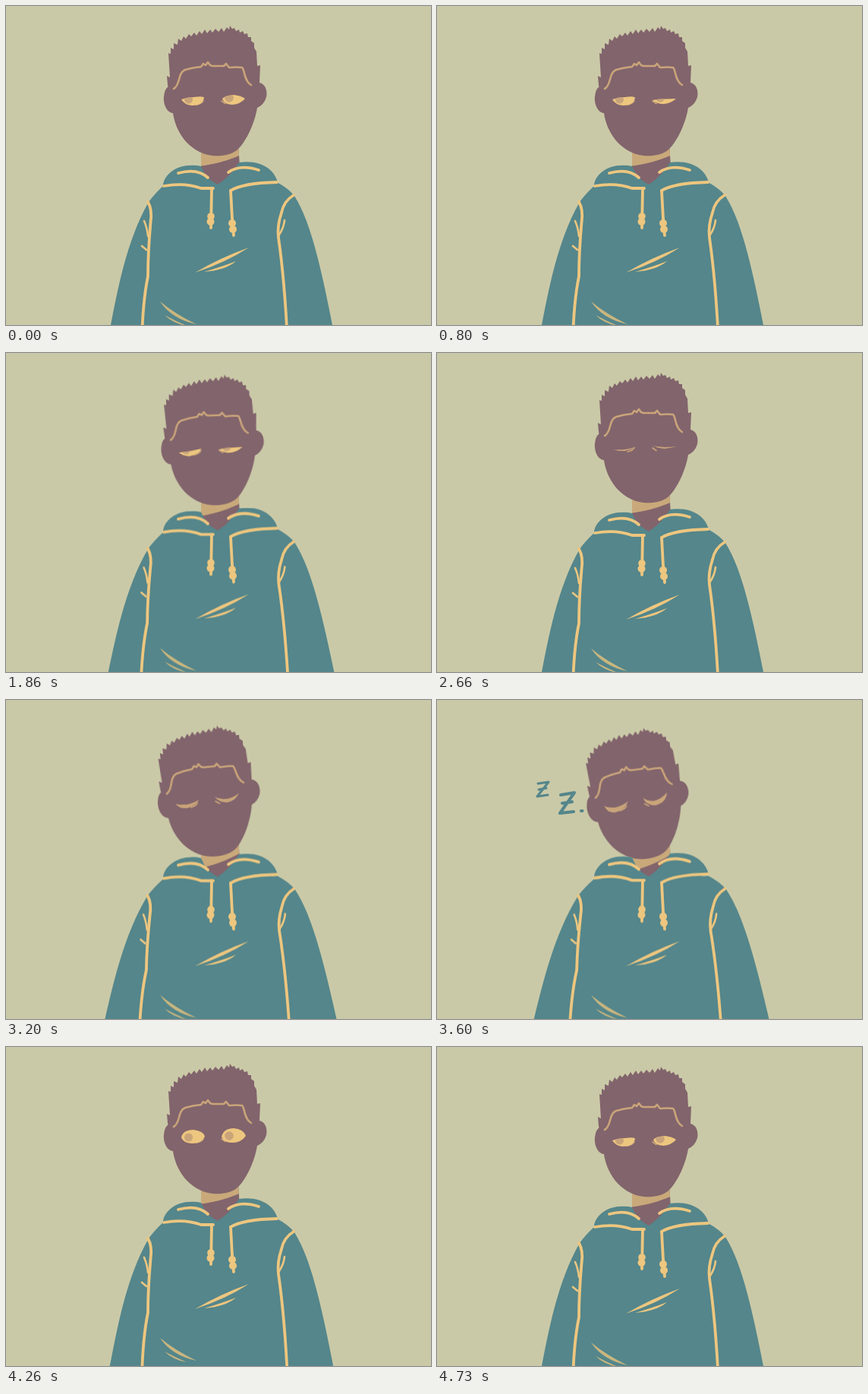
Write an HTML page without scripts that moves like this. It is 560 by 420 pixels and loops after 5000 ms.

```html
<!DOCTYPE html>
<html lang="en">
<head>
<meta charset="utf-8">
<title>Dozing off</title>
<style>
/* How far the sleeves sag outwards: 0 upright, 1 asleep. */
@property --sag { syntax: "<number>"; inherits: true; initial-value: 0; }

:root {
  --skin: #82646c; --cloth: #54868b; --line: #edc67f; --tan: #c9a47a;
  --nod: translate(-3.5px, 3.2px) rotate(-2.4deg);
  --droop: translate(-7.5px, 4px) rotate(-4.5deg);
  --asleep: translate(-11px, 12.5px) rotate(-7.3deg);
}
html, body { margin: 0; width: 100%; height: 100%; overflow: hidden; background: #cac9a7; }
svg { display: block; width: 560px; height: 420px; }
.stroke { fill: none; stroke: var(--line); stroke-width: 3.8; stroke-linecap: round; stroke-linejoin: round; }
.fine { stroke-width: 2.6; }
.tan { stroke: var(--tan); }
.skin { fill: var(--skin); }
.cloth { fill: var(--cloth); }

.head, .torso, .lid, .z { animation: 5s linear infinite; }
.head { transform-origin: 277px 120.5px; animation-name: head; }
.torso { animation-name: torso; }
.sleeve, .seam { transform-origin: 0 220px; transform: skewX(calc(var(--sag) * var(--lean))); }
.sleeve.l { --lean: -2.9deg; }
.sleeve.r { --lean: 2.1deg; }
.seam.l { --lean: -1.2deg; }
.seam.r { --lean: 1.1deg; }
.hood { transform-origin: 0 300px; transform: scaleY(calc(1 + .035 * var(--sag))); }

/* Eye shapes: each has the same four curves so they can morph. */
.lid { d: var(--base); fill: var(--line); animation-name: lid; }
.left {
  --wide: path("M231 123Q233 113 247 113Q261 115 262 122Q258 131 245 131Q233 130 231 123Z");
  --base: path("M231 123Q239 120 247 120Q261 118 261 121Q259 131 245 131Q235 130 231 123Z");
  --tired: var(--base);
  --half: path("M231 126Q239 125 247 124.5Q254 123 261 122Q257 130 244 131.5Q235 130 231 126Z");
  --shut: path("M231 127Q239 128 247 127Q255 126 262 123.5Q256 127.5 247 129Q239 129.5 231 127Z");
  --sleep: path("M231 121Q236 125 245 125Q255 124 263 119Q257 130 245 131.5Q233 131 231 121Z");
}
.right {
  --wide: path("M284 122Q287 111 300 111Q313 112 316 121Q310 130 298 130Q287 130 284 122Z");
  --base: path("M285 122Q288 118 300 117Q310 118 315 122Q309 129 298 130Q287 129 285 122Z");
  --half: path("M284 124Q290 122 300 122.5Q308 122 315 122Q307 129 298 129Q290 129 284 124Z");
  --tired: var(--half);
  --shut: path("M284 121.5Q290 124 300 124Q308 124 316 123Q308 125 300 126Q290 125 284 121.5Z");
  --sleep: path("M283 117Q288 122.5 297 123Q308 121 315 114Q313 127 298 129Q285 127 283 117Z");
}

.z { fill: none; stroke: var(--cloth); stroke-linecap: round; stroke-linejoin: round; opacity: 0; animation-timing-function: step-end; }
.z1 { stroke-width: 3; animation-name: z1; }
.z2 { stroke-width: 4; animation-name: z2; }
.z3 { stroke-width: 4.2; stroke-dasharray: 4; animation-name: z3; }

@keyframes head {
  0%, 16% { transform: none; animation-timing-function: steps(4); }
  21.2%, 22.6% { transform: var(--nod); animation-timing-function: steps(1); }
  24%, 26.6% { transform: var(--droop); animation-timing-function: steps(3); }
  30.6%, 33.2% { transform: none; animation-timing-function: steps(3); }
  37.2%, 38.6% { transform: var(--nod); animation-timing-function: steps(2); }
  41.2%, 42.6% { transform: var(--droop); animation-timing-function: steps(1); }
  44%, 46.6% { transform: var(--nod); animation-timing-function: steps(3); }
  50.6%, 53.2% { transform: none; animation-timing-function: steps(3); }
  57.2% { transform: var(--nod); animation-timing-function: steps(8); }
  68%, 78.6% { transform: var(--asleep); animation-timing-function: steps(5); }
  85.2%, 86.6% { transform: translate(0, -4px) rotate(0deg); animation-timing-function: steps(2); }
  89.2%, 100% { transform: none; }
}
@keyframes torso {
  0%, 16% { --sag: 0; transform: none; animation-timing-function: steps(4); }
  21.2%, 26.6% { --sag: .3; transform: translateY(-.5px); animation-timing-function: steps(3); }
  30.6%, 33.2% { --sag: 0; transform: none; animation-timing-function: steps(3); }
  37.2%, 46.6% { --sag: .3; transform: translateY(-.5px); animation-timing-function: steps(3); }
  50.6%, 53.2% { --sag: 0; transform: none; animation-timing-function: steps(3); }
  57.2% { --sag: .3; transform: translateY(-.5px); animation-timing-function: steps(8); }
  68%, 78.6% { --sag: 1; transform: translateY(-.5px); animation-timing-function: steps(5); }
  85.2%, 86.6% { --sag: 0; transform: translateY(-6px); animation-timing-function: steps(2); }
  89.2%, 100% { --sag: 0; transform: none; }
}
@keyframes lid {
  0%, 4% { d: var(--base); fill: var(--line); animation-timing-function: steps(3); }
  8%, 9.2% { d: var(--shut); fill: var(--tan); animation-timing-function: steps(3); }
  13.2%, 16% { d: var(--tired); fill: var(--line); animation-timing-function: steps(4); }
  21.2%, 26.6% { d: var(--half); fill: var(--line); animation-timing-function: steps(3); }
  30.6%, 33.2% { d: var(--base); fill: var(--line); animation-timing-function: steps(3); }
  37.2%, 52% { d: var(--half); fill: var(--line); animation-timing-function: steps(1); }
  53.2%, 57.2% { d: var(--shut); fill: var(--tan); animation-timing-function: steps(8); }
  68%, 78.6% { d: var(--sleep); fill: var(--tan); animation-timing-function: steps(5); }
  85.2%, 90.6% { d: var(--wide); fill: var(--line); animation-timing-function: steps(3); }
  94.6%, 100% { d: var(--base); fill: var(--line); }
}
@keyframes z1 { 0%, 76%, 100% { opacity: 0; } 69.2% { opacity: 1; } }
@keyframes z2 { 0%, 77.2%, 100% { opacity: 0; } 70.6% { opacity: 1; } }
@keyframes z3 {
  0%, 78.6%, 100% { opacity: 0; stroke-dashoffset: 3.7; }
  72% { opacity: 1; stroke-dashoffset: 3.7; }
  73.2% { opacity: 1; stroke-dashoffset: 1.5; }
  74.6% { opacity: 1; stroke-dashoffset: 0; }
}
</style>
</head>
<body>
<svg viewBox="0 0 560 420">
  <defs>
    <clipPath id="leftEye"><path class="lid left"/></clipPath>
    <clipPath id="rightEye"><path class="lid right"/></clipPath>
    <path id="neckShape" d="M257 180V222L279 242 308 212 306 180Z"/>
    <clipPath id="neck"><use href="#neckShape"/></clipPath>
  </defs>

  <use href="#neckShape" class="skin"/>
  <g clip-path="url(#neck)">
    <path class="head" fill="#c9a97a" d="M240 170V212Q284 210 320 191V170Z"/>
  </g>

  <g class="head">
    <path class="skin" d="M218 130L213 104 212 92 216 94 214 62 217 63 217 55 221 57 221 49 226 51 227 43 231 46 234 40 237 43 241 37 244 40 248 35 251 39 255 33 258 37 262 31 265 36 269 31 272 35 276 30 280 34 284 29 287 34 291 28 294 31 295 26 298 30 301 29 303 33 307 31 308 35 312 33 314 37 318 36 319 41 323 41 323 46 327 49 327 55 330 60 331 79 335 78 334 101C341 102 345 111 343 120Q340 130 331 134C327 158 314 182 304 190C296 196 285 198 272 197C240 193 223 164 220 141C211 140 207 128 208 119Q209 109 214 106Z"/>
    <path class="stroke fine tan" d="M221 109C230 104 226 88 236 84Q246 81 257 80L260 76 263 78 266 74 269 78 272 79 287 79 290 76 294 81Q304 80 311 81C315 84 313 98 323 104"/>
    <path class="stroke tan" style="stroke-width:1.6" d="M251 130Q257 129 260 125M284 125L289 128.5"/>
    <path class="lid left"/>
    <path class="lid right"/>
    <circle cx="240.5" cy="123" r="5.5" fill="#c9a47a" clip-path="url(#leftEye)"/>
    <circle cx="294" cy="121" r="5.8" fill="#c9a47a" clip-path="url(#rightEye)"/>
  </g>

  <g class="torso">
    <path class="cloth sleeve l" d="M133 442L138 420C146 380 158 310 188 258Q196 247 208 236L300 240V442Z"/>
    <path class="cloth sleeve r" d="M434 442L430 420C417 355 403 286 380 250Q372 240 357 232L260 240V442Z"/>
    <g class="seam l">
      <path class="stroke" d="M187 258Q193 268 190.5 285Q187 325 187 356Q180 390 179 442"/>
      <path class="stroke fine" d="M182 283Q186 292 187 303M179 316L185 321"/>
    </g>
    <g class="seam r">
      <path class="stroke" d="M379 249Q366 257 363 272Q357 290 359 305Q367 360 371 442"/>
      <path class="stroke fine" d="M367 282Q366 292 360 301"/>
    </g>

    <g class="hood">
      <path class="cloth" d="M207 237C207 224 222 211 240 210Q250 209 257 211Q264 228 279 235Q296 224 307 206C338 202 354 217 358 232L300 250H265Z"/>
      <path class="stroke" d="M208 237Q235 232 257 240L273 240M227 220Q252 213 266 226M293 219Q308 208 333 216M296 243Q312 233 357 232"/>
      <path class="stroke" d="M271 240L270 292M296 243L298 280 300 302"/>
      <g fill="#edc67f">
        <circle cx="270" cy="277" r="4.8"/><circle cx="269.5" cy="284" r="5"/>
        <circle cx="298" cy="286" r="5"/><circle cx="299" cy="294" r="5"/>
      </g>
    </g>

    <g fill="#edc67f">
      <path d="M249 351Q283 331 320 318Q289 338 249 351Z"/>
      <path d="M261 350Q285 343 303 336Q289 348 261 350Z"/>
    </g>
    <g fill="#c9b67f">
      <path d="M203 389Q222 405 251 419Q218 412 203 389Z"/>
      <path d="M209 407Q222 414 238 421Q220 418 209 407Z"/>
    </g>
  </g>

  <path class="z z1" d="M133 110L147 108 132 127 146 125M134 118L144 116"/>
  <path class="z z2" d="M163 125L181 122 162 149 180 147M165 136L178 134"/>
  <path class="z z3" pathLength="4" d="M190 146L194 146 189 155 194 154"/>
</svg>
</body>
</html>
```
